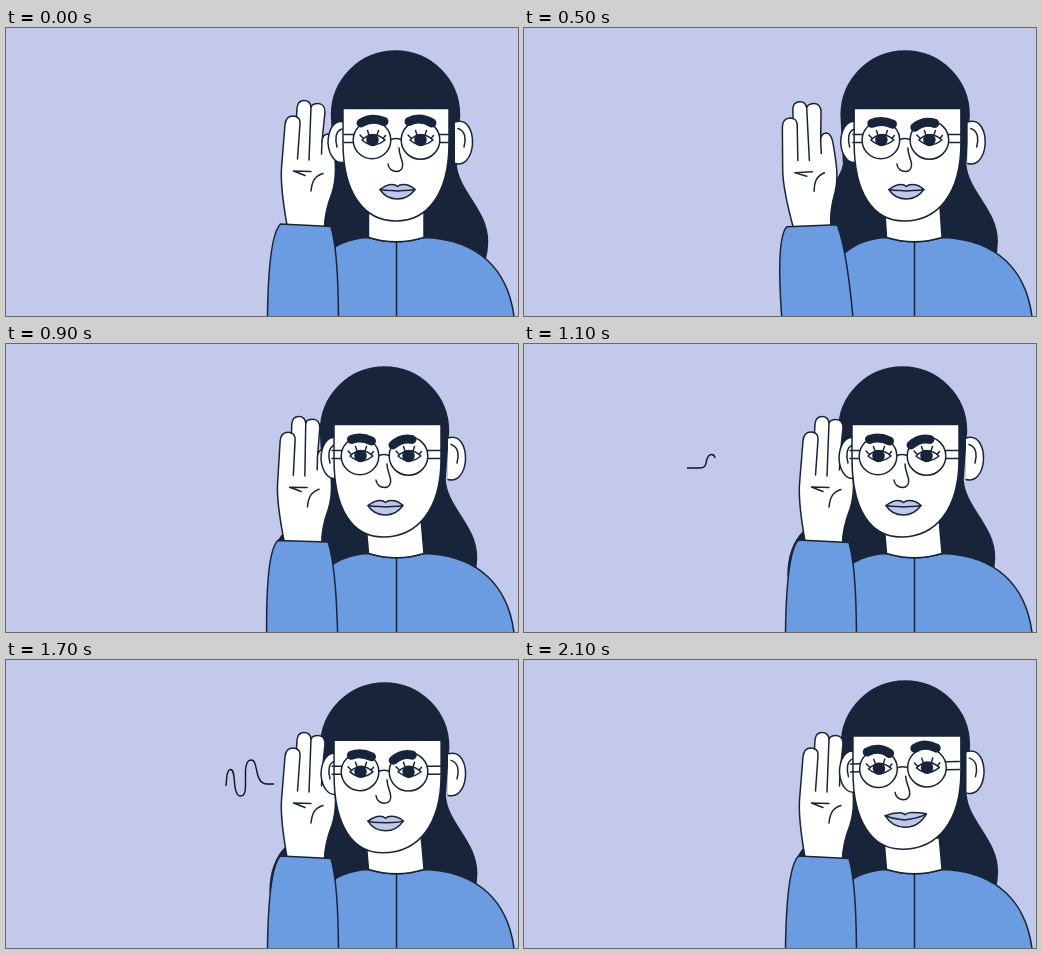
An HTML page without scripts that plays this animation: 512x288 px, repeating every 2200 ms.

```html
<!DOCTYPE html>
<html lang="en">
<head>
<meta charset="utf-8">
<title>Listening</title>
<style>
  @property --x { syntax: "<length>"; inherits: false; initial-value: 0px; }
  @property --y { syntax: "<length>"; inherits: false; initial-value: 0px; }
  @property --tilt { syntax: "<angle>"; inherits: false; initial-value: 0deg; }

  :root {
    --ink: #18243a;
    --skin: #fff;
    --cloth: #6b9be0;
    --lip: #c0c8ea;
    --loop: 2200ms;
    /* ease-in-out held over seven 100 ms poses */
    --stair: linear(0 0% 14.28%, .01 14.28% 28.56%, .05 28.56% 42.85%, .13 42.85% 57.13%,
      .42 57.13% 71.42%, .76 71.42% 85.7%, .95 85.7% 100%);
  }
  html, body { margin: 0; width: 100%; height: 100%; overflow: hidden; background: #c2c9eb; }
  svg { display: block; width: 100%; height: 100%; }
  .line { fill: none; }
  .skin { fill: var(--skin); }
  .cloth { fill: var(--cloth); }
  .ink { fill: var(--ink); }
  .lip { fill: var(--lip); }
  .brow { fill: none; stroke-width: 9; }

  .hair, .ears, .face, .features, .neck, .brow, .lip, .smile {
    animation: var(--loop) var(--stair) infinite;
  }
  .hair, .ears, .features { transform: translate(var(--x), var(--y)) rotate(var(--tilt)); }
  .hair { animation-name: hair; }
  .ears { animation-name: ears; }
  .face { animation-name: face; }
  .features { animation-name: features; transform-origin: 390px 112px; }
  .neck { animation-name: neck; transform: skewX(var(--tilt)); transform-origin: 0 209px; }
  .brow.l { animation-name: brow-l; }
  .brow.r { animation-name: brow-r; }
  .lip { animation-name: lip; }
  .smile { animation-name: smile; }
  .arm {
    transform: rotate(var(--tilt)); transform-origin: 300px 330px;
    animation: arm var(--loop) step-end infinite;
  }
  .wave {
    fill: none; stroke: #0d1322; stroke-width: 1.4; stroke-linecap: butt; stroke-dasharray: 156 1000;
    animation: wave var(--loop) steps(22) infinite;
  }

  @keyframes wave { from { stroke-dashoffset: 566px } to { stroke-dashoffset: -330px } }

  @keyframes arm {
    0% { --tilt: 0deg }
    4.545% { --tilt: -.05deg }
    9.09% { --tilt: -.25deg }
    13.636% { --tilt: -.65deg }
    18.181% { --tilt: -2.5deg }
    22.727% { --tilt: -5.1deg }
    27.272% { --tilt: -6.4deg }
    31.818% { --tilt: -5.4deg }
    36.363% { --tilt: -3.2deg }
    40.909% { --tilt: -1.2deg }
    45.454% { --tilt: -.3deg }
    50%, 100% { --tilt: 0deg }
  }

  @keyframes hair {
    0% { --x: 0px; --y: 0px }
    31.818%, 68.181% { --x: -11px; --y: 0px }
    100% { --x: -8px; --y: -2px }
  }
  @keyframes ears {
    0% { --x: 0px; --y: 0px }
    31.818%, 68.181% { --x: -7px; --y: 0px }
    100% { --x: -6.5px; --y: -2.5px }
  }
  @keyframes features {
    0% { --x: 0px; --y: 0px; --tilt: 0deg }
    31.818%, 68.181% { --x: -12px; --y: 0px; --tilt: 0deg }
    100% { --x: -11.5px; --y: -4px; --tilt: -1.4deg }
  }
  @keyframes neck {
    0% { --tilt: 0deg }
    31.818%, 100% { --tilt: 5deg }
  }
  @keyframes face {
    0% { d: path("M337 80.5V115C337 165 358 193 390 193C422 193 443 165 443 115V80.5Z") }
    31.818%, 68.181% { d: path("M328 80.5V115C328 165 346 193 377 193C412 193 435 165 435 115V80.5Z") }
    100% { d: path("M329 75.8V111C329 161 348 189 378 189C414 189 437 161 437 111V75.8Z") }
  }
  @keyframes brow-l {
    0% { d: path("M355 95Q366 88.5 378 93.5") }
    31.818%, 68.181% { d: path("M357.5 95.5Q367 92 377.500 97") }
    100% { d: path("M355 95Q367 89 377.5 97") }
  }
  @keyframes brow-r {
    0% { d: path("M403 93.5Q414 88 426 95") }
    31.818%, 68.181% { d: path("M399 101Q408 93 418 95.5") }
    100% { d: path("M403 92Q413 86 424.5 92.5") }
  }
  @keyframes lip {
    0%, 68.181% { d: path("M374 161.5C378 158.5 383 156.5 386 156.5Q389.5 156.5 391.5 158.5Q393.5 156.5 397 156.5C401 156.5 406 158.5 409 161.5C404 168.5 398 171 391.5 171C384 171 378 168 374 161.5Z") }
    100% { d: path("M371.5 159C376 157.5 382 156.5 386 156.5Q389.5 156.5 391.5 158.5Q393.5 156.5 398 156.5C403 156.5 408 157 413 158C408 167 400 171 391.5 171C382 171 376 167 371.5 159Z") }
  }
  @keyframes smile {
    0%, 68.181% { d: path("M374 161.5C382 163.5 386 162 391.5 163C397 162 401 163.5 409 161.5") }
    100% { d: path("M371.5 159C380 163 386 162.5 391.5 164C398 162.5 404 163 413 158") }
  }
</style>
</head>
<body>
<svg viewBox="0 0 512 288" stroke="#18243a" stroke-width="1.5" stroke-linecap="round" stroke-linejoin="round">
  <defs>
    <g id="eye">
      <path class="skin" d="M356 112Q367 101.500 379 112Q367 121.500 356 112Z"/>
      <circle class="ink" cx="366.500" cy="112" r="5.500"/>
      <path class="line" d="M357.500 110.500L354 107M363 107L361.500 102.500M371 107L372.500 102.500M377 110.500L379.500 107.500"/>
    </g>
  </defs>

  <path class="wave" d="M163 124H175C181 124 181.500 122 182.500 117C183.500 112.500 185 110.500 187.500 110.500C190.500 110.500 191.500 113 191.500 118V124C191.500 130 193 133.500 196 133.500C200 133.500 200.500 129 201 122C201.500 112 202.500 107 206 107C210 107 210.500 112 211 119C211.500 127 213 131.500 216 131.500C219.500 131.500 220 127 220.500 120C221 113 222 109.500 224.500 109.500C227.500 109.500 228 115 228.500 122C229 131 230.500 136 234.500 136C239 136 239.500 131 239.500 124V110C240 103 241.500 100 245 100C249 100 249.500 105 251 112C252.500 120 256 124 261 124H268"/>

  <path class="hair ink" d="M325.500 87A64 64 0 0 1 453.500 87L450 136C452 164 482 182 481.500 214Q481.500 222 479 232H275C275 212 280 198 291 187C312 165 326 150 328 136Z"/>

  <path class="cloth" d="M362 209.500C330 211 300 228 285 300H509C506 240 470 211 418 209.500Q390 218 362 209.500Z"/>
  <path class="line" d="M390.500 214V289"/>
  <g class="neck">
    <path class="skin" d="M362.500 178V209.500Q390 218 418 209.500V178Z"/>
  </g>

  <g class="arm">
    <path class="skin" d="M281.500 200C277 175 274.500 155 275.500 140L279 97C279.500 91 282 88 287 88C288.500 88 289.500 88.300 290.500 88.800L291 80C291.500 75 294 72.500 298 72.500C302 72.500 304.500 75 305 79C306 76.500 309 75.500 312 75.500C316.500 75.500 319 79 319 84L316 113C316.500 108.500 319 106 322 106C326 106.500 327.500 111 328 116C329.500 135 331 150 326 165C321 178 318.500 187 318.500 200Z"/>
    <path class="line" d="M290.500 88.800Q294.500 90.500 294 96L291.500 131M305 79L303 132M316 113L315.500 126M317 145.500C309 148 306 153 305 163M305 143.500L287.500 143L299 147.500"/>
    <path class="cloth" d="M274.500 196L325 198.500C331 220 333 255 332.500 330H261.500V288C262 250 265 205 274.500 196Z"/>
  </g>

  <g class="ears">
    <path class="skin" d="M338 94C328 91 322 102 322 115C323 128 330 137 339 134"/>
    <path class="line" d="M336 101C329 103 329 112 331 119"/>
    <path class="skin" d="M449 94C462 90 467 104 466.500 116C465.500 130 458 138 449 135.500"/>
    <path class="line" d="M452 100.500C460 103 460 112 458 119"/>
  </g>

  <path class="face skin" d="M337 80.500V115C337 165 358 193 390 193C422 193 443 165 443 115V80.500Z"/>

  <g class="features">
    <path class="line" d="M338 106.500H347.500M338 114.500H347M433 106.500H447M433.500 114.500H447M385 111.500Q390 109.500 395 111.500"/>
    <circle class="skin" cx="366" cy="112" r="18.800"/>
    <circle class="skin" cx="414.500" cy="112" r="19.300"/>
    <use href="#eye"/>
    <use href="#eye" x="48"/>
    <path class="brow l" d="M355 95Q366 88.500 378 93.500"/>
    <path class="brow r" d="M403 93.500Q414 88 426 95"/>
    <path class="line" d="M382 136C382.500 141 386.500 143.500 390.500 143.500C395 143.500 397.500 140 396.500 135C395.500 130 393 126 393 120"/>
    <path class="lip" d="M374 161.500C378 158.500 383 156.500 386 156.500Q389.500 156.500 391.500 158.500Q393.500 156.500 397 156.500C401 156.500 406 158.500 409 161.500C404 168.500 398 171 391.500 171C384 171 378 168 374 161.500Z"/>
    <path class="smile line" d="M374 161.500C382 163.500 386 162 391.500 163C397 162 401 163.500 409 161.500"/>
  </g>
</svg>
</body>
</html>
```
